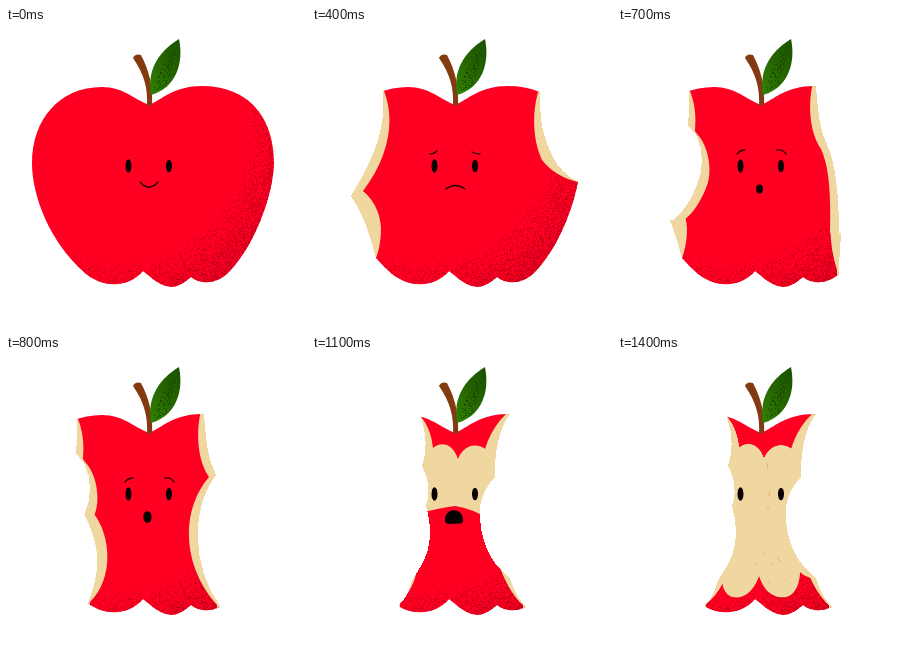
Animation of 300x300 px, one loop 1.6 s. Source, as an HTML page:

```html
<!DOCTYPE html>
<html lang="en">
<head>
<meta charset="utf-8">
<title>Apple being eaten</title>
<style>
html, body { margin: 0; width: 100%; height: 100%; overflow: hidden; background: #fff; }
svg { display: block; width: 100vw; height: 100vh; }
</style>
</head>
<body>
<svg viewBox="0 0 300 300">
  <defs>
    <clipPath id="skin"><path id="outline"/></clipPath>
    <linearGradient id="green" x1="0.9" y1="0" x2="0.2" y2="1">
      <stop offset="0" stop-color="#1a5200"/>
      <stop offset="0.5" stop-color="#256400"/>
      <stop offset="1" stop-color="#2f7d04"/>
    </linearGradient>
  </defs>
  <g clip-path="url(#skin)">
    <rect width="300" height="300" fill="#ff0022"/>
    <path id="grain" fill="#d0001c" shape-rendering="crispEdges"/>
    <path id="mouthFill" fill="#0a0000"/>
    <path id="lines" fill="none" stroke="#200" stroke-width="1.4" stroke-linecap="round"/>
    <g id="flesh" fill="#f0d7a0"></g>
    <g fill="none" stroke="#f2a583">
      <path id="highFlecks" d="M149 107l1 6M152 135l-1 5M150 150v3"/>
      <path id="lowFlecks" d="M137 207l2 3M152 209l3-3M160 202l2 4M146 196v3M128 221l2-2M165 222l2 2M151 225l1 3"/>
    </g>
  </g>
  <g id="gone" fill="#fff" shape-rendering="crispEdges"></g>
  <g fill="#0a0000">
    <ellipse cx="122.5" cy="138" rx="3" ry="6.7"/>
    <ellipse cx="163" cy="138" rx="3" ry="6.3"/>
  </g>
  <path fill="#843a10" d="M127 30Q129 25 135 27C143 42 147 58 146 77L141 78C142 60 138 46 127 30Z"/>
  <path fill="url(#green)" d="M145 67C141 45 150 25 173 11C178 35 170 60 145 67Z"/>
  <path id="leafGrain" fill="#164600" shape-rendering="crispEdges"/>
</svg>
<script>
const LOOP = 1600;
const el = id => document.getElementById(id);

el('outline').setAttribute('d',
  'M143 77C128 71 117 59 96 59C53 59 26 92 26 135C26 167 43 214 80 246' +
  'C100 262 125 258 137 243C146 250 155 259 166 259C175 258 181 252 185 249' +
  'C195 257 210 256 222 245C247 220 267 170 268 135C268 90 243 58 196 58C168 58 157 71 143 77Z');

// Front bites share the scalloped red rim at the top.
const rim = 'M109 61C117 70 120 82 121 92C128 86 140 86 146 103C150 92 162 84 175 94C182 78 190 68 197 59H230V250';
const rightFlank = 'H213L211 249C200 238 197 226 195 218';
const leftFlank = 'C108 225 98 240 88 248L60 250V61Z';
const leftScallop = 'C138 228 132 239 122 241C110 243 104 235 104 221';

// Each bite: start time, flesh laid bare, part taken away.
const bites = [
  [200, 'M0 154H27C50 155 68 175 69 200C69 215 66 225 64 230V300H0Z',
        'M0 154H27C45 172 55 195 64 230V300H0Z'],
  [300, 'M300 40H226V64C219 90 222 115 230 132Q244 150 270 155H300Z',
        'M300 40H228V65C228 90 229 110 245 136Q255 150 270 155H300Z'],
  [400, 'M0 40H72V63C83 90 78 128 51 163H0Z',
        'M0 40H71V64C73 95 68 120 39 168H0Z'],
  [500, 'M300 132H230C212 165 207 205 219 242V300H300Z',
        'M300 136H245C232 160 222 185 221 242V300H300Z'],
  [600, 'M0 95H72L79 106C91 118 95 145 88 160C82 175 75 185 66 192H0Z',
        'M0 95H68L78 107C86 122 86 143 78 159C72 175 64 185 55 192H0Z'],
  [700, 'M300 40H194V59C190 80 192 105 203 121C211 138 213 165 212 205H300Z',
        'M300 40H198V59C200 80 200 100 210 119C217 135 221 165 221 205H300Z'],
  [800, 'M0 158H88C105 180 108 222 84 246V300H0ZM300 121H203C174 155 176 210 211 249V300H300Z',
        'M0 158H78C95 190 95 215 82 247V300H0ZM300 119H210C185 150 185 210 214 250V300H300Z'],
  [900, 'M0 40H109V61C123 85 125 105 106 145C108 155 106 170 101 180C108 205 108 225 88 247V300H0Z',
        'M0 40H109V61C114 85 113 110 94 137C100 150 99 165 92 180C102 205 98 230 87 249V300H0Z'],
  [1000, 'M300 40H194V58C166 85 162 130 183 167L180 175C183 205 195 235 211 249V300H300Z',
         'M300 40H198V58C180 90 178 120 193 165L186 180C190 205 200 235 214 250V300H300Z'],
  [1100, rim + 'V165H180Q160 152 143 150Q126 152 106 158H60V61Z',
         'M0 40H109V61C115 80 115 95 110 110C118 125 118 140 114 150C122 178 118 198 104 218C97 226 99 238 87 249V300H0Z' +
         'M300 40H198V58C185 75 183 100 183 121C178 126 170 137 168 150C166 185 180 208 195 219C202 226 200 238 214 250V300H300Z'],
  [1200, rim + rightFlank + 'C172 210 151 185 143 156C138 185 125 210 106 219' + leftFlank, ''],
  [1300, rim + rightFlank + 'C172 210 151 185 143 156L141 220' + leftScallop + leftFlank, ''],
  [1400, rim + 'H213L211 249C203 239 200 230 197 224C192 221 187 221 182 216' +
         'C182 226 178 239 168 241C155 243 146 235 141 220' + leftScallop + leftFlank, '']
];

// Each mood: start time, drawn lines, filled mouth.
const sadBrows = 'M118 126Q122 126 125 123M160 124Q163 126 168 126';
const highBrows = 'M119 126Q122 122 127 122M159 122Q165 121 168 126';
const oval = (x, y, rx, ry) => `M${x - rx} ${y}a${rx} ${ry} 0 1 0 ${2 * rx} 0a${rx} ${ry} 0 1 0 ${-2 * rx} 0Z`;
const wail = 'M133 164C133 151 151 151 151 164C151 170 146 166 142 168C138 167 133 170 133 164Z';
const moods = [
  [0, 'M134 154Q143 164 152 154', ''],
  [200, 'M135 156Q143 163 152 156', ''],
  [300, 'M135 158Q143 159 152 158', ''],
  [400, 'M134 161Q143 154 153 161' + sadBrows, ''],
  [500, 'M134 162Q143 151 154 162' + sadBrows, ''],
  [700, highBrows, oval(141.5, 161, 3.5, 4.5)],
  [800, highBrows, oval(141.5, 161, 4.2, 6)],
  [900, highBrows, oval(142, 161, 6, 6.5)],
  [1000, 'M121 118Q124 114 128 115M158 114Q162 114 166 118', wail],
  [1100, '', wail],
  [1300, '', '']
];

function addPath(parent, d) {
  const p = document.createElementNS('http://www.w3.org/2000/svg', 'path');
  p.setAttribute('d', d);
  el(parent).append(p);
  return p;
}
const layers = bites.map(([at, bare, taken]) => [at, addPath('flesh', bare), addPath('gone', taken)]);

// Seeded speckle, denser where the shade function is higher.
let seed = 7;
function random() {
  seed = (seed * 16807) % 2147483647;
  return seed / 2147483647;
}
function speckle(id, x0, y0, w, h, shade) {
  let d = '';
  for (let y = y0; y < y0 + h; y++) {
    for (let x = x0; x < x0 + w; x++) {
      if (random() < shade(x, y)) d += `M${x} ${y}h1v1h-1z`;
    }
  }
  el(id).setAttribute('d', d);
}
speckle('grain', 50, 58, 220, 202, (x, y) =>
  (Math.hypot((x - 110) / 158, (y - 100) / 160) - 0.82) * 2.2);
speckle('leafGrain', 147, 24, 26, 38, (x, y) => {
  const along = (62 - y) / 38;
  const off = Math.abs(x - (152 + along * 14));
  return off < 7 - along * 3 ? 0.2 : 0;
});

const show = (node, on) => { node.style.display = on ? 'inline' : 'none'; };

function draw(t) {
  for (const [at, bare, taken] of layers) {
    show(bare, t >= at);
    show(taken, t >= at);
  }
  const [, lines, mouth] = moods.filter(m => t >= m[0]).pop();
  el('lines').setAttribute('d', lines);
  el('mouthFill').setAttribute('d', mouth);
  show(el('highFlecks'), t >= 1200);
  show(el('lowFlecks'), t >= 1400);
}

let start;
function tick(now) {
  start ??= now;
  draw((now - start) % LOOP);
  requestAnimationFrame(tick);
}
draw(0);
requestAnimationFrame(tick);
</script>
</body>
</html>
```
